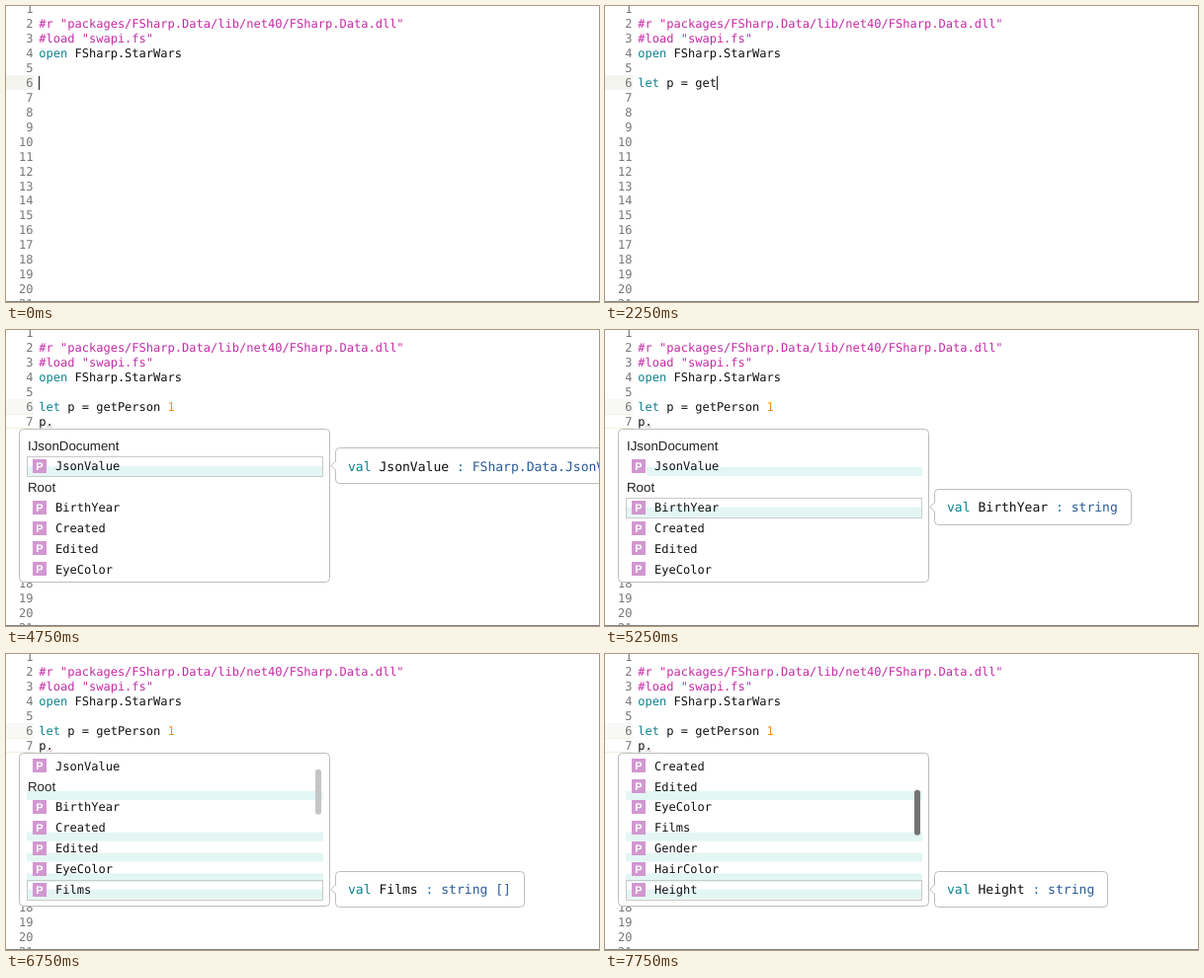
Write an HTML page with a canvas that moves like this. It is 600 px wide and 300 px high and loops after 8 s.

```html
<!DOCTYPE html>
<html lang="en">
<head>
<meta charset="utf-8">
<title>Editor completion</title>
<style>
html, body { margin: 0; width: 100%; height: 100%; overflow: hidden; background: #fff; }
canvas { display: block; }
</style>
</head>
<body>
<canvas id="stage" width="600" height="300"></canvas>
<script>
const ctx = document.getElementById('stage').getContext('2d');
ctx.textRendering = 'geometricPrecision';
const MONO = '"DejaVu Sans Mono", monospace';
const SANS = '"Liberation Sans", Arial, sans-serif';
const INK = '#101010', KEYWORD = '#0d8290', STRING = '#c42aa6', NUMBER = '#f08f2c';
const COLON = '#1f74a2', TYPE = '#2b5c98', TEAL = '#e3f6f4';
const STEP = 250, LOOP = 8000;
const LEFT = 33.2, LINE = 14.92, ROW = 20.85;
const CODE_SIZE = 12.04, TIP_SIZE = 13.05;
const lineY = n => 18 + LINE * (n - 2);

const TYPED = ['', 'l', 'le', 'let', 'let ', 'let p', 'let p ', 'let p = ', 'let p = g',
  'let p = get', 'let p = getP', 'let p = getPe', 'let p = getPers', 'let p = getPerson ',
  'let p = getPerson 1'];
const ENTER = 15, POPUP = 18, TIP = 19;

// Completion rows; those without a type are group headings.
const ROWS = [
  ['IJsonDocument'], ['JsonValue', 'FSharp.Data.JsonValue'], ['Root'],
  ['BirthYear', 'string'], ['Created', 'System.DateTime'], ['Edited', 'System.DateTime'],
  ['EyeColor', 'string'], ['Films', 'string []'], ['Gender', 'string'],
  ['HairColor', 'string'], ['Height', 'string'], ['Homeworld', 'string']
];
// Selected row for each step after the popup opens.
const SELECTION = [1, 1, 1, 3, 3, 4, 5, 6, 7, 7, 8, 8, 9, 10];
const rowY = (i, scroll) => 117.1 + ROW * i - scroll;
const scrollFor = i => Math.max(0, rowY(i, 0) - 238.5);

function text(str, x, y, color = INK, size = CODE_SIZE, family = MONO, weight = '') {
  ctx.font = `${weight} ${size}px ${family}`;
  ctx.fillStyle = color;
  ctx.fillText(str, x, y + size * 0.365);
  return x + ctx.measureText(str).width;
}

function tokens(list, x, y, size) {
  for (const [str, color] of list) x = text(str, x, y, color, size);
  return x;
}

function rect(x, y, w, h, color) {
  ctx.fillStyle = color;
  ctx.fillRect(x, y, w, h);
}

function panel(x, y, w, h, r) {
  ctx.beginPath();
  ctx.roundRect(x, y, w, h, r);
  ctx.fillStyle = '#fff';
  ctx.fill();
  ctx.strokeStyle = '#bdbdbd';
  ctx.lineWidth = 1;
  ctx.stroke();
}

function caret(x, line) {
  rect(Math.round(x), Math.round(lineY(line) - 7), 1, 14, '#222');
}

function gutter(step) {
  rect(0, 70, 28, 15, step < ENTER ? '#f4f4ef' : '#f8f8f6');
  if (step >= ENTER) {
    rect(0, 85, 28, 1, '#f0f0e2');
    rect(0, 99, 28, 1, '#f0f0e2');
  }
  ctx.textAlign = 'right';
  for (let n = 1; n <= 21; n++) text(n, 27.6, lineY(n), '#777');
  ctx.textAlign = 'left';
}

function code(step) {
  tokens([['#r "packages/FSharp.Data/lib/net40/FSharp.Data.dll"', STRING]], LEFT, lineY(2));
  tokens([['#load "swapi.fs"', STRING]], LEFT, lineY(3));
  tokens([['open', KEYWORD], [' FSharp.StarWars', INK]], LEFT, lineY(4));

  const typed = TYPED[Math.min(step, TYPED.length - 1)];
  const parts = typed.split(/(let|1)/).map(s => [s, s === 'let' ? KEYWORD : s === '1' ? NUMBER : INK]);
  let end = tokens(parts, LEFT, lineY(6));
  if (step < ENTER) return caret(end, 6);

  end = text('p.'.slice(0, step - ENTER), LEFT, lineY(7));
  if (step < POPUP) caret(end, 7);
  else squiggle(41, 98.7);
}

function squiggle(x, y) {
  ctx.beginPath();
  for (let i = 0; i < 4; i++) ctx.lineTo(x + i * 2, y - i % 2);
  ctx.strokeStyle = '#c8a0a0';
  ctx.lineWidth = 0.7;
  ctx.stroke();
}

function popup(step) {
  const at = step - POPUP, selected = SELECTION[at], scroll = scrollFor(selected);
  panel(13.5, 100.5, 314, 155, 4);
  ctx.save();
  ctx.beginPath();
  ctx.rect(14, 104, 313, 148);
  ctx.clip();

  // Rows already visited keep a pale lower half.
  const bandX = scroll ? 21 : 42;
  for (const i of new Set(SELECTION.slice(0, at))) {
    if (i < 6) rect(bandX, rowY(i, 0) + 1, 321 - bandX, 9, TEAL);
  }
  const y = rowY(selected, scroll);
  rect(21, y, 300, 10, TEAL);
  ctx.strokeStyle = '#c9c9c9';
  ctx.lineWidth = 1;
  ctx.strokeRect(21.5, Math.round(y - 10) + 0.5, 299, 20);

  ROWS.forEach(([name, type], i) => {
    const cy = rowY(i, scroll);
    if (cy < 104 || cy > 251) return;
    if (!type) return text(name, 22, cy, '#222', 13.3, SANS);
    rect(27, Math.round(cy - 7), 14, 14, '#d297d0');
    text('P', 30.3, cy, '#fff', 11, SANS, 'bold');
    text(name, 50, cy);
  });
  if (scroll) scrollbar(scroll, step);
  ctx.restore();
  if (step >= TIP) tooltip(ROWS[selected], y);
}

function scrollbar(scroll, step) {
  ctx.beginPath();
  ctx.roundRect(313, 108.6 + scroll * 0.334, 6, 46, 3);
  ctx.fillStyle = step === 27 ? '#c5c5c5' : '#737373';
  ctx.fill();
}

function tooltip([name, type], y) {
  const parts = [['val', KEYWORD], [` ${name} `, INK], [':', COLON], [` ${type}`, TYPE]];
  ctx.font = `${TIP_SIZE}px ${MONO}`;
  const width = ctx.measureText(parts.map(p => p[0]).join('')).width;
  const top = Math.round(y - 18.6) + 0.5;
  panel(333.5, top, Math.round(width + 26), 36, 4);
  const mid = top + 18;
  ctx.beginPath();
  ctx.moveTo(334, mid - 5);
  ctx.lineTo(328.8, mid);
  ctx.lineTo(334, mid + 5);
  ctx.fillStyle = '#fff';
  ctx.fill();
  ctx.strokeStyle = '#bdbdbd';
  ctx.stroke();
  tokens(parts, 346, y, TIP_SIZE);
}

function draw() {
  const step = Math.floor((performance.now() % LOOP) / STEP);
  rect(0, 0, 600, 300, '#fff');
  gutter(step);
  code(step);
  if (step >= POPUP) popup(step);
  rect(0, 299, 600, 1, '#858585');
  requestAnimationFrame(draw);
}
draw();
</script>
</body>
</html>
```
